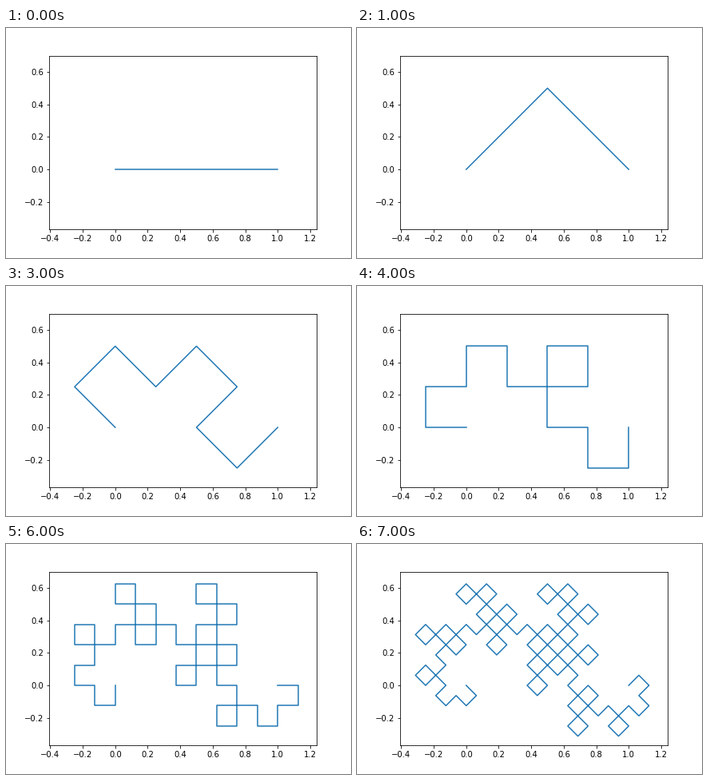
Recreate the animation shown at these times as a matplotlib script. Size 432 by 288 pixels, loop 8000 ms.

```python
import numpy as np
import matplotlib.pyplot as plt
from matplotlib.animation import FuncAnimation

STEPS = 8
STEP_MS = 1000
BOX = dict(left=0.125, right=0.9, bottom=0.125, top=0.88)


def fold(points):
    """Replace each segment by a right-angled pair, alternating sides."""
    start, delta = points[:-1], np.diff(points)
    side = 1j * (-1.0) ** np.arange(len(delta))
    out = np.empty(2 * len(points) - 1, complex)
    out[::2] = points
    out[1::2] = start + delta * (1 + side) / 2
    return out


def dragon(order):
    points = np.array([0, 1], complex)
    for _ in range(order):
        points = fold(points)
    return points


fig, ax = plt.subplots(figsize=(6, 4), dpi=72, facecolor="white")
fig.subplots_adjust(**BOX)

# Limits hold the fully grown curve, with equal scale on both axes.
full = dragon(16)
x_lo, x_hi = full.real.min(), full.real.max()
y_mid = (full.imag.min() + full.imag.max()) / 2
margin = 0.05 * (x_hi - x_lo)
width = x_hi - x_lo + 2 * margin
height = width * 4 * (BOX["top"] - BOX["bottom"]) / (6 * (BOX["right"] - BOX["left"]))
ax.set_xticks(np.arange(-2, 7) / 5)
ax.set_yticks(np.arange(-1, 4) / 5)
ax.set_xlim(x_lo - margin, x_hi + margin)
ax.set_ylim(y_mid - height / 2, y_mid + height / 2)

line, = ax.plot([], [], color="C0", lw=1.5)


def draw(order):
    points = dragon(order)
    line.set_data(points.real, points.imag)
    return line,


anim = FuncAnimation(fig, draw, frames=STEPS, interval=STEP_MS, repeat=True)
plt.show()
```
